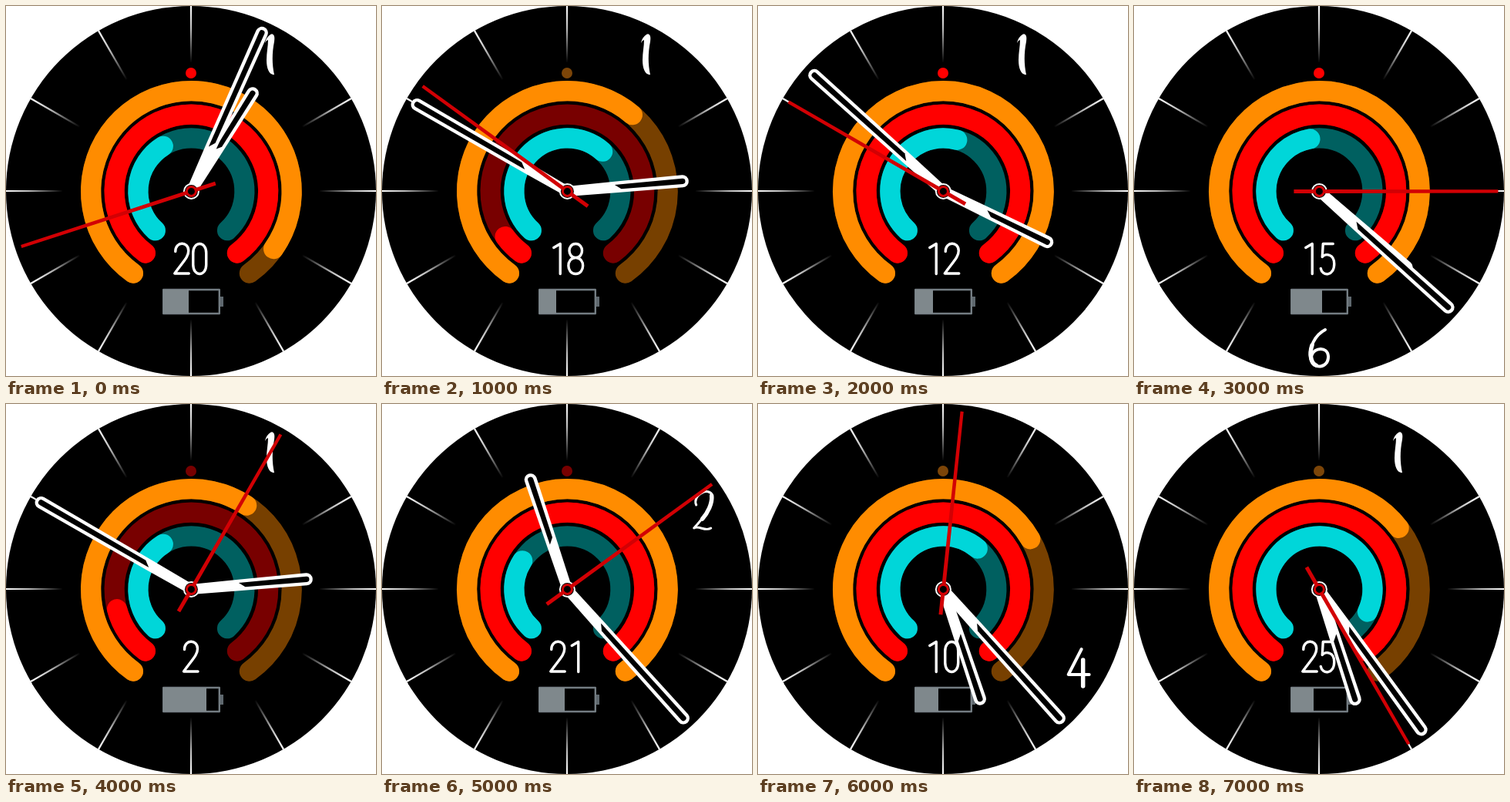
Animation of 480x480 px, one loop 8000 ms. Source, as an HTML page:

```html
<!DOCTYPE html>
<html lang="en">
<head>
<meta charset="utf-8">
<title>Watch face</title>
<style>
  html, body { margin: 0; width: 100%; height: 100%; overflow: hidden; background: #fff; }
  svg { display: block; width: 100%; height: 100%; }
  .line { fill: none; stroke: #fff; stroke-linecap: round; stroke-linejoin: round; }
</style>
</head>
<body>
<svg viewBox="0 0 480 480">
  <defs>
    <linearGradient id="fade" gradientUnits="userSpaceOnUse" x1="0" y1="-240" x2="0" y2="-166">
      <stop offset="0" stop-color="#fff"/>
      <stop offset=".4" stop-color="#bbb"/>
      <stop offset="1" stop-color="#000"/>
    </linearGradient>
  </defs>
  <circle cx="240" cy="240" r="240"/>
  <g id="ticks" transform="translate(240 240)"></g>
  <g id="month" class="line"></g>
  <circle id="dot" cx="240" cy="87" r="7"/>
  <g id="rings" transform="translate(240.4 240.4)" fill="none" stroke-width="26.2" stroke-linecap="round"></g>
  <g id="day" class="line" stroke-width="3.4"></g>
  <g fill="#7f888c">
    <path d="M204.2 368H276.8V399H204.2Z" fill="none" stroke="#737c82" stroke-width="2.4" stroke-linejoin="round"/>
    <rect x="278" y="377" width="4" height="13" fill="#5f686e"/>
    <rect id="charge" x="204" y="368" height="31"/>
  </g>
  <g transform="translate(240.4 240.4)">
    <g id="hour"></g>
    <g id="minute"></g>
    <circle r="10.5" fill="#fff"/>
    <circle r="8.5"/>
    <path id="second" d="M-2.5 33V0L-2.1-232H2.1L2.5 0V33Z" fill="#d20004"/>
    <circle r="6" stroke="#d20004" stroke-width="3"/>
  </g>
</svg>
<script>
const $ = id => document.getElementById(id);
const RED = '#f00', MAROON = '#780000', BROWN = '#7c4508';

// radius, half sweep in degrees, lit colour, dim colour
const RINGS = [
  [130.3, 144.6, '#ff8c00', '#774000'],
  [99.8, 143.4, '#f00', MAROON],
  [69, 137.5, '#00d6d9', '#006060']
];

// Stroked numerals, 39 high, centred on x = 0
const DIGITS = {
  0: 'M-8.5 12C-8.5-4 8.5-4 8.5 12V27C8.5 43-8.5 43-8.5 27Z',
  1: 'M-5 5L3.5 0V39',
  2: 'M-8 10C-8-3.5 9-3.5 9 9C9 17 3 22-9 38.5H9.5',
  5: 'M7 0H-6L-7 17C-3 12 8.5 13 8.5 26C8.5 42-7 43-9 32',
  8: 'M0 0C11 0 11 18 0 18C-11 18-11 0 0 0ZM0 18C12.5 18 12.5 39 0 39C-12.5 39-12.5 18 0 18Z'
};

// Brush numerals centred on the hour mark
const MONTHS = {
  1: '<path fill="#fff" stroke="none" d="M-6-15C-5-21-1-26 3-27C7-26 6.5-21 6-17C3-2 3 12 6 26C-1 26-4 17-4 7C-4-3-2-11-2-19C-4-19-5-17-6-15Z"/>',
  2: '<path stroke-width="3" d="M-9-7C-12-13-7-21-1-23C5-26 12-24 12-17C12-6 1 9-12 23C-6 19 3 28 10 23"/><path stroke-width="5.5" d="M11-19C12-9 6 3-1 11"/>',
  4: '<path stroke-width="4" d="M3-24L-14 9H13"/><path stroke-width="5.5" d="M5-10V24"/>',
  6: '<path stroke-width="4" d="M8-24C-6-17-13 0-11 13C-8 29 13 26 12 10C11-2-6-2-10 10"/><path stroke-width="5.5" d="M-9-4C-13 8-10 20-4 22"/>'
};

const SCENES = [
  { time: [1, 4, 42], month: 1, day: 20, dot: RED, ends: [125, 143.4, -32], charge: 33 },
  { time: [2, 50, 51], month: 1, day: 18, dot: BROWN, ends: [40.4, -126, 41.5], charge: 22 },
  { time: [3, 52, 50], month: 1, day: 12, dot: RED, ends: [144.6, 143.4, 15], charge: 23 },
  { time: [4, 22, 15], month: 6, day: 15, dot: RED, ends: [144.6, 143.4, -10], charge: 40 },
  { time: [2, 50, 5], month: 1, day: 2, dot: MAROON, ends: [33.4, -105, -32], charge: 56 },
  { time: [11, 23, 9], month: 2, day: 21, dot: MAROON, ends: [144.6, 143.4, -57.5], charge: 33 },
  { time: [5, 23, 1], month: 4, day: 10, dot: BROWN, ends: [60, 143.4, 40], charge: 30 },
  { time: [5, 24, 25], month: 1, day: 25, dot: BROWN, ends: [52.4, 143.4, 115], charge: 29 }
];

const polar = (r, deg) => {
  const a = deg * Math.PI / 180;
  return [r * Math.sin(a), -r * Math.cos(a)];
};
const arc = (r, from, to) =>
  `M${polar(r, from)}A${r} ${r} 0 ${to - from > 180 ? 1 : 0} 1 ${polar(r, to)}`;
const turn = (id, deg) => $(id).setAttribute('transform', `rotate(${deg})`);

const hand = len => `
  <path fill="#fff" d="M-6.5 0L-7.2-62L-8 ${-len}A8 8 0 0 1 8 ${-len}L7.2-62L6.5 0Z"/>
  <path d="M-3-62L-3.6 ${-len}A3.6 3.6 0 0 1 3.6 ${-len}L3-70Z"/>`;

$('hour').innerHTML = hand(150);
$('minute').innerHTML = hand(225);
$('ticks').innerHTML = Array.from({ length: 12 }, (_, i) =>
  `<path fill="url(#fade)" d="M-1.1-240H1.1V-167H-1.1Z" transform="rotate(${i * 30})"/>`).join('');
$('rings').innerHTML = RINGS.map(([r, half, lit, dim]) =>
  `<path stroke="${dim}" d="${arc(r, -half, half)}"/><path class="lit" stroke="${lit}"/>`).join('');
const lit = document.querySelectorAll('.lit');

function show({ time: [h, m, s], month, day, dot, ends, charge }) {
  turn('hour', h * 30 + m / 2);
  turn('minute', m * 6);
  turn('second', s * 6);

  [...$('ticks').children].forEach((t, i) => t.style.display = i === month ? 'none' : '');
  const [x, y] = polar(204, month * 30);
  $('month').innerHTML = `<g transform="translate(${240 + x} ${240 + y})">${MONTHS[month]}</g>`;

  const chars = [...String(day)];
  $('day').innerHTML = chars.map((c, i) =>
    `<path d="${DIGITS[c]}" transform="translate(${239.5 + (i - (chars.length - 1) / 2) * 23.5} 308.5)"/>`).join('');

  $('dot').setAttribute('fill', dot);
  $('charge').setAttribute('width', charge);
  RINGS.forEach(([r, half], i) => lit[i].setAttribute('d', arc(r, -half, ends[i])));
}

let shown = -1;
const start = performance.now();
function tick() {
  const i = Math.floor((performance.now() - start) / 1000) % SCENES.length;
  if (i !== shown) show(SCENES[shown = i]);
  requestAnimationFrame(tick);
}
tick();
</script>
</body>
</html>
```
